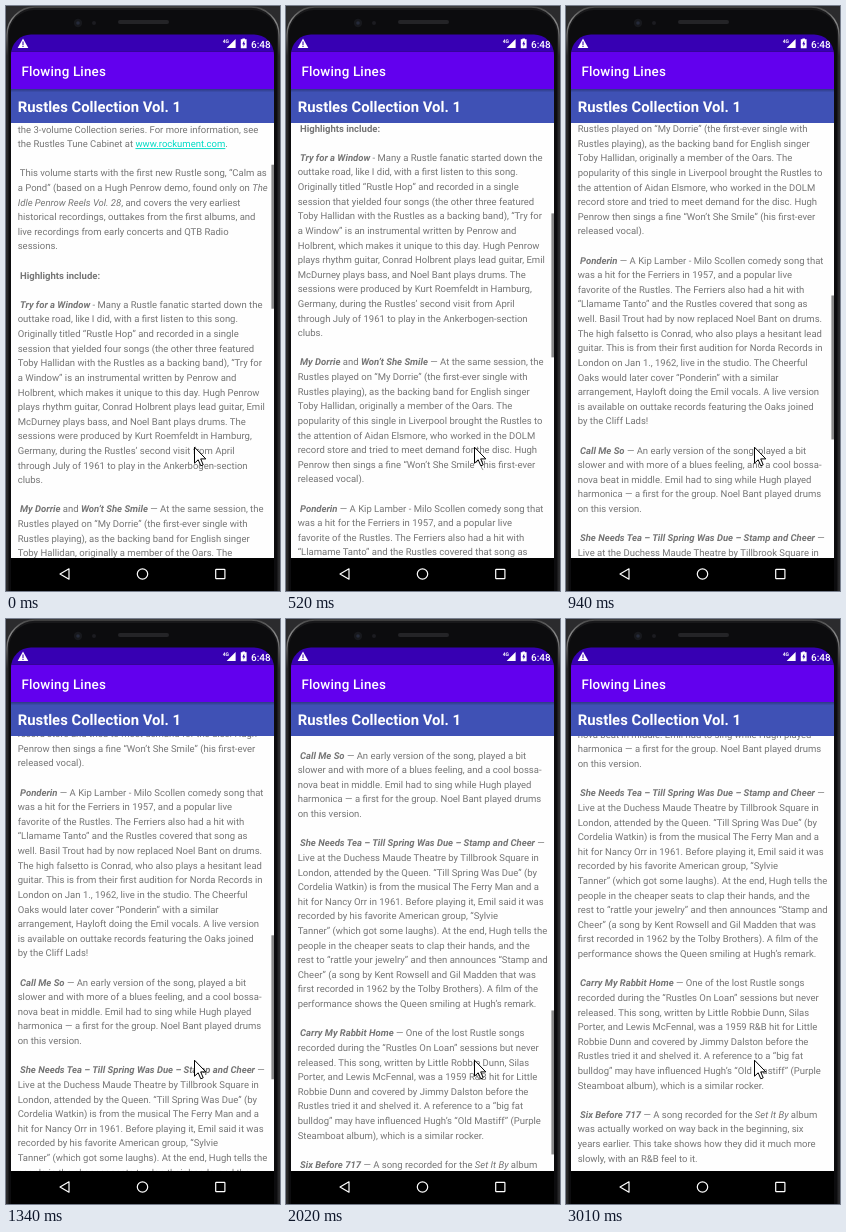
Recreate the animation shown at these times as an HTML page. Size 274 by 585 pixels, loop 3.58 s.

```html
<!DOCTYPE html>
<html lang="en">
<head>
<meta charset="utf-8">
<title>Flowing Lines</title>
<style>
  html, body { margin: 0; width: 100%; height: 100%; overflow: hidden; background: #202022; }
  svg { display: block; width: 274px; height: 585px; }
  text { font-family: Roboto, sans-serif; white-space: pre; text-rendering: geometricPrecision; }
  #article text { font-size: 9.5px; fill: #757575; }
  .b { font-weight: 700; }
  .i { font-style: italic; }
  .bi { font-weight: 700; font-style: italic; }
  .link { fill: #03dac5; text-decoration: underline; }
</style>
</head>
<body>
<svg viewBox="0 0 274 585">
  <defs>
    <clipPath id="screen"><rect x="5" y="28.6" width="263" height="580" rx="20"/></clipPath>
    <clipPath id="view"><rect x="5" y="117" width="263" height="435"/></clipPath>
    <linearGradient id="shade" x2="0" y2="1">
      <stop offset="0" stop-opacity=".28"/>
      <stop offset="1" stop-opacity="0"/>
    </linearGradient>
    <linearGradient id="rim" gradientUnits="userSpaceOnUse" x1="0" y1="0" x2="0" y2="50">
      <stop offset="0" stop-color="#444"/>
      <stop offset=".3" stop-color="#8a8a8a"/>
      <stop offset="1" stop-color="#2b2b2d"/>
    </linearGradient>
  </defs>

  <!-- phone body -->
  <rect width="274" height="585" fill="#2b2b2d"/>
  <rect x="1" y="1" width="272" height="640" rx="28" fill="#19191b" stroke="url(#rim)" stroke-width="1.5"/>
  <rect x="3" y="4" width="268" height="640" rx="25" fill="#0c0c0e"/>
  <circle cx="72" cy="17" r="4.2" fill="#17181c"/>
  <circle cx="72" cy="17" r="1.8" fill="#252a3a"/>
  <circle cx="88" cy="17" r="2" fill="#1c1c20"/>
  <rect x="112" y="14" width="51" height="4" rx="2" fill="#242427"/>

  <g clip-path="url(#screen)">
    <rect x="5" y="117" width="263" height="435" fill="#fefefe"/>
    <g clip-path="url(#view)">
      <g id="article"></g>
      <rect id="thumb" x="265.4" width="2.6" height="144" fill="#000"/>
      <ellipse id="glow" cx="162" rx="394" fill="#6200ee"/>
    </g>

    <rect x="5" y="83" width="263" height="34" fill="#3f51b5"/>
    <rect x="5" y="83" width="263" height="3.5" fill="url(#shade)"/>
    <text x="11.7" y="106" font-size="14.86" font-weight="700" fill="#fff">Rustles Collection Vol. 1</text>
    <rect x="5" y="45.5" width="263" height="37.5" fill="#6200ee"/>
    <text x="15.4" y="69.6" font-size="13.4" font-weight="500" letter-spacing=".17" fill="#fff">Flowing Lines</text>

    <!-- status bar -->
    <rect x="5" y="28" width="263" height="17.5" fill="#3700b3"/>
    <path d="M17 32.6L22.3 42H11.7Z" fill="#fff"/>
    <path d="M17 35.6V38.9M17 39.8V41" stroke="#3700b3" stroke-width="1.1"/>
    <g transform="translate(1.4 0)" fill="#fff">
      <text x="215.3" y="37.3" font-size="5" font-weight="700">4G</text>
      <path d="M228.2 33V42H219.2Z"/>
      <path d="M235 33.2V32.4H237.6V33.2H239.2V42.2H233.4V33.2Z"/>
      <path d="M236.8 34.6L234.9 38.2H236.1V40.8L237.9 37.2H236.8Z" fill="#3700b3"/>
      <text x="243.6" y="41.6" font-size="10" font-weight="500">6:48</text>
    </g>

    <!-- navigation bar -->
    <rect x="5" y="552" width="263" height="33" fill="#000"/>
    <g fill="none" stroke="#fff" stroke-width="1.2" stroke-linejoin="round">
      <path d="M54 568L63 562.8V573.2Z"/>
      <circle cx="136.5" cy="568" r="5.2"/>
      <rect x="209.7" y="563.4" width="9.2" height="9.2" rx=".6"/>
    </g>
  </g>

  <path d="M188.5 441.2V457.2L192.2 453.8L194.8 459.8L197.2 458.8L194.7 452.9H199.8Z"
        fill="#fff" stroke="#000" stroke-width="1" stroke-linejoin="round"/>
</svg>

<script>
// Marks: *bold italic*  _italic_  #bold#  ~link~
const ARTICLE = `the 3-volume Collection series. For more information, see
the Rustles Tune Cabinet at ~www.rockument.com~.

 This volume starts with the first new Rustle song, “Calm as
a Pond” (based on a Hugh Penrow demo, found only on _The_
_Idle Penrow Reels Vol. 28_, and covers the very earliest
historical recordings, outtakes from the first albums, and
live recordings from early concerts and QTB Radio
sessions.

 #Highlights include:#

 *Try for a Window* - Many a Rustle fanatic started down the
outtake road, like I did, with a first listen to this song.
Originally titled “Rustle Hop” and recorded in a single
session that yielded four songs (the other three featured
Toby Hallidan with the Rustles as a backing band), “Try for
a Window” is an instrumental written by Penrow and
Holbrent, which makes it unique to this day. Hugh Penrow
plays rhythm guitar, Conrad Holbrent plays lead guitar, Emil
McDurney plays bass, and Noel Bant plays drums. The
sessions were produced by Kurt Roemfeldt in Hamburg,
Germany, during the Rustles’ second visit from April
through July of 1961 to play in the Ankerbogen-section
clubs.

 *My Dorrie* and *Won’t She Smile* — At the same session, the
Rustles played on “My Dorrie” (the first-ever single with
Rustles playing), as the backing band for English singer
Toby Hallidan, originally a member of the Oars. The
popularity of this single in Liverpool brought the Rustles to
the attention of Aidan Elsmore, who worked in the DOLM
record store and tried to meet demand for the disc. Hugh
Penrow then sings a fine “Won’t She Smile” (his first-ever
released vocal).

 *Ponderin* — A Kip Lamber - Milo Scollen comedy song that
was a hit for the Ferriers in 1957, and a popular live
favorite of the Rustles. The Ferriers also had a hit with
“Llamame Tanto” and the Rustles covered that song as
well. Basil Trout had by now replaced Noel Bant on drums.
The high falsetto is Conrad, who also plays a hesitant lead
guitar. This is from their first audition for Norda Records in
London on Jan 1., 1962, live in the studio. The Cheerful
Oaks would later cover “Ponderin” with a similar
arrangement, Hayloft doing the Emil vocals. A live version
is available on outtake records featuring the Oaks joined
by the Cliff Lads!

 *Call Me So* — An early version of the song, played a bit
slower and with more of a blues feeling, and a cool bossa-
nova beat in middle. Emil had to sing while Hugh played
harmonica — a first for the group. Noel Bant played drums
on this version.

 *She Needs Tea – Till Spring Was Due – Stamp and Cheer* —
Live at the Duchess Maude Theatre by Tillbrook Square in
London, attended by the Queen. “Till Spring Was Due” (by
Cordelia Watkin) is from the musical The Ferry Man and a
hit for Nancy Orr in 1961. Before playing it, Emil said it was
recorded by his favorite American group, “Sylvie
Tanner” (which got some laughs). At the end, Hugh tells the
people in the cheaper seats to clap their hands, and the
rest to “rattle your jewelry” and then announces “Stamp and
Cheer” (a song by Kent Rowsell and Gil Madden that was
first recorded in 1962 by the Tolby Brothers). A film of the
performance shows the Queen smiling at Hugh’s remark.

 *Carry My Rabbit Home* — One of the lost Rustle songs
recorded during the “Rustles On Loan” sessions but never
released. This song, written by Little Robbie Dunn, Silas
Porter, and Lewis McFennal, was a 1959 R&B hit for Little
Robbie Dunn and covered by Jimmy Dalston before the
Rustles tried it and shelved it. A reference to a “big fat
bulldog” may have influenced Hugh’s “Old Mastiff” (Purple
Steamboat album), which is a similar rocker.

 *Six Before 717* — A song recorded for the _Set It By_ album
was actually worked on way back in the beginning, six
years earlier. This take shows how they did it much more
slowly, with an R&B feel to it.`;

const LOOP = 3580, LINE = 14.615;
const VIEW = { top: 117, bottom: 552 };
const START = 126, CONTENT = 1314;   // distance already scrolled, full height
const STYLES = { '*': 'bi', '_': 'i', '#': 'b', '~': 'link' };

// [time, scroll]: the picture holds between these steps
const STEPS = [
  [0, 0], [120, 20], [240, 55], [370, 98], [520, 147], [670, 230], [790, 310], [940, 395],
  [1340, 476], [1460, 548], [1610, 620], [2020, 703], [2170, 753], [2320, 753], [2470, 753],
  [2620, 753], [2740, 753], [2860, 753], [3010, 753]
];

const byId = id => document.getElementById(id);
const article = byId('article'), thumb = byId('thumb'), glow = byId('glow');
const clamp = v => Math.max(0, Math.min(1, v));

function add(parent, tag, attrs, content = '') {
  const el = document.createElementNS(parent.namespaceURI, tag);
  for (const key in attrs) el.setAttribute(key, attrs[key]);
  el.textContent = content;
  return parent.appendChild(el);
}

ARTICLE.split('\n').forEach((line, row) => {
  if (!line) return;
  const text = add(article, 'text', { x: 11.7, y: 126.5 + row * LINE });
  for (const part of line.match(/([*_#~]).+?\1|[^*_#~]+/g)) {
    const style = STYLES[part[0]];
    add(text, 'tspan', style ? { class: style } : {}, style ? part.slice(1, -1) : part);
  }
});

// Overscroll glow: pulled up until 2470, then recedes
function drawGlow(t) {
  const pull = clamp((t - 2170) / 300) ** 3;
  const left = t < 2170 ? 0 : (1 - clamp((t - 2470) / 540)) ** 2;
  const height = (38.5 + 8 * pull) * left;
  const ry = 394 * height / 52.8;
  glow.setAttribute('ry', ry);
  glow.setAttribute('cy', VIEW.bottom - height + ry);
  glow.setAttribute('opacity', (0.36 + 0.06 * pull) * left);
}

function draw(time) {
  const [t, scroll] = STEPS.findLast(step => step[0] <= time);
  const ratio = (VIEW.bottom - VIEW.top) / CONTENT;
  article.setAttribute('transform', `translate(0 ${-scroll})`);
  thumb.setAttribute('y', VIEW.top + (START + scroll) * ratio);
  thumb.setAttribute('opacity', 0.46 * (1 - clamp((t - 2600) / 380)));
  drawGlow(t);
}

const begin = performance.now();
function tick() {
  draw((performance.now() - begin) % LOOP);
  requestAnimationFrame(tick);
}
tick();
</script>
</body>
</html>
```
